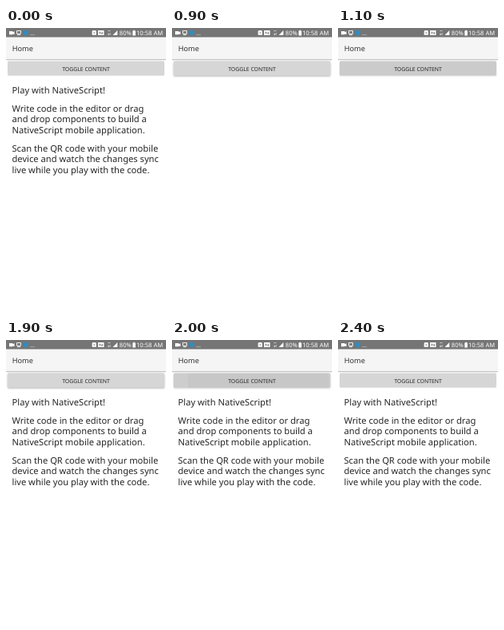
An HTML page that plays this animation: 200 by 356 pixels, repeating every 2600 ms.

```html
<!DOCTYPE html>
<html lang="en">
<head>
<meta charset="utf-8">
<title>Toggle content</title>
<style>
  html, body { margin: 0; width: 100%; height: 100%; overflow: hidden; background: #fff; }
  svg { display: block; width: 100%; height: 100%; }
  text { font-family: "Noto Sans", sans-serif; fill: #262626; text-rendering: geometricPrecision; }
  .status text { font-size: 7.6px; fill: #fff; }
  .content text { font-size: 11.17px; }
</style>
</head>
<body>
<svg viewBox="0 0 200 356">
  <defs>
    <clipPath id="buttonShape"><rect x="2" y="41.4" width="196" height="18.3" rx="1.5"/></clipPath>
    <filter id="soft" x="-5%" y="-30%" width="110%" height="160%"><feGaussianBlur stdDeviation=".8"/></filter>
  </defs>
  <rect width="200" height="356" fill="#fff"/>

  <rect y="11" width="200" height="28" fill="#f5f5f5"/>
  <rect y="39" width="200" height="1" fill="#c4c4c4"/>
  <rect y="40" width="200" height="1" fill="#eee"/>
  <text x="7.7" y="29" font-size="9.2" style="fill:#333">Home</text>

  <g class="status">
    <rect width="200" height="11.5" fill="#757575"/>
    <g fill="#fff">
      <path d="M4 4h4.5v1.2l2-1v4l-2-1v1.1H4z"/>
      <path d="M108.5 3h3.4l.9 1v4.8h-5.2V4z"/>
      <path d="M115 3h7.5v6H115z"/>
      <path d="M133.5 9l5.8-6v6z"/>
      <path d="M158.3 3.5h1v-.8h1.6v.8h1v6h-3.6z"/>
    </g>
    <path d="M13.5 3.5h5v3.7h-5zM14 8.6h4" fill="none" stroke="#fff" stroke-width=".9"/>
    <path d="M117 7.6V4.8l3.4 2.8V4.8M110.2 5v2" fill="none" stroke="#757575" stroke-width=".9"/>
    <circle cx="25" cy="6" r="3.2" fill="#328cbd"/>
    <text x="30" y="8.7">...</text>
    <path d="M128.2 8.8V6.3m-1 1.4l1 1.2 1-1.2M130.2 6v2.8M127.3 3.6h3.2" fill="none" stroke="#eee" stroke-width=".7"/>
    <text x="141.8" y="9">80%</text>
    <text x="163" y="9">10:58 AM</text>
  </g>

  <rect id="shadow" x="2" y="42.5" width="196" height="18" rx="1.5" fill="#777" filter="url(#soft)"/>
  <g clip-path="url(#buttonShape)">
    <rect x="2" y="41" width="196" height="19" fill="#d6d6d6"/>
    <rect id="tint" x="2" y="41" width="196" height="19"/>
    <circle id="ripple" cx="108" cy="51" r="0"/>
  </g>
  <text x="100" y="53.5" font-size="6.87" text-anchor="middle">TOGGLE CONTENT</text>

  <g class="content" id="content">
    <text x="7.5" y="82">Play with NativeScript!</text>
    <text x="7.5" y="104.7">Write code in the editor or drag</text>
    <text x="7.5" y="118.2">and drop components to build a</text>
    <text x="7.5" y="131.7">NativeScript mobile application.</text>
    <text x="7.5" y="154.5">Scan the QR code with your mobile</text>
    <text x="7.5" y="168">device and watch the changes sync</text>
    <text x="7.5" y="181.5">live while you play with the code.</text>
  </g>
</svg>
<script>
  const LOOP = 2600, STEP = 100, HIDE = 900, SHOW = 1900;
  const [shadow, tint, ripple, content] =
    ["shadow", "tint", "ripple", "content"].map(id => document.getElementById(id));
  const clamp = v => Math.max(0, Math.min(1, v));

  function draw(now) {
    const time = Math.floor(now % LOOP / STEP) * STEP;
    const age = time - (time < SHOW ? HIDE : SHOW);
    const pressed = age >= 0;
    const fade = pressed ? clamp((450 - age) / 350) : 0;

    content.setAttribute("visibility", time >= HIDE && time < SHOW ? "hidden" : "visible");
    shadow.setAttribute("opacity", pressed ? 0.6 * clamp(1 - age / 300) : 0);
    tint.setAttribute("opacity", 0.045 * fade * clamp(age / 100));
    ripple.setAttribute("r", pressed ? 88 * age / 100 : 0);
    ripple.setAttribute("opacity", 0.03 * fade);
    requestAnimationFrame(draw);
  }
  requestAnimationFrame(draw);
</script>
</body>
</html>
```
